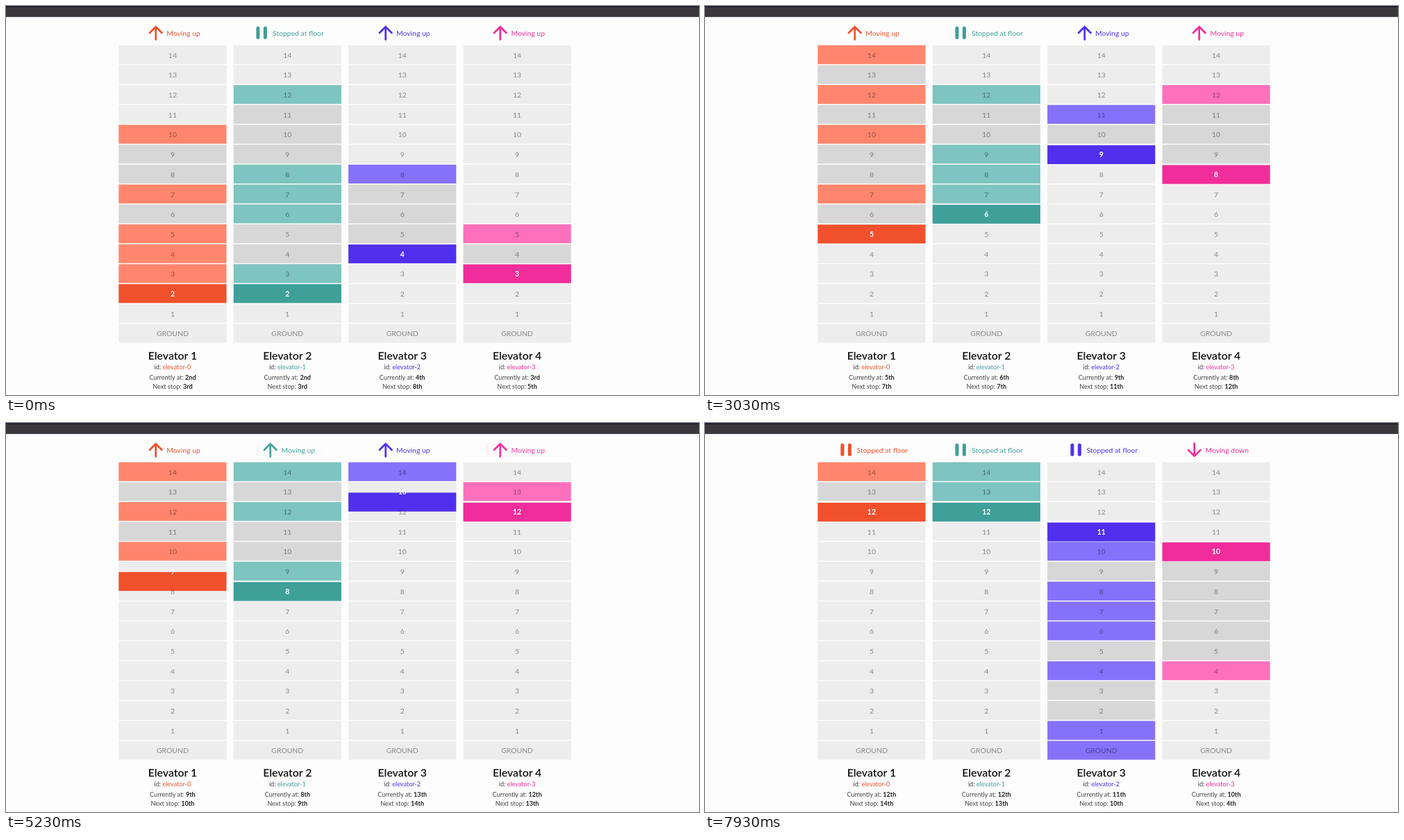
Animation, 998 px wide and 561 px high, one loop 8 s. Source, as an HTML page:

```html
<!DOCTYPE html>
<html lang="en">
<head>
<meta charset="utf-8">
<title>Elevators</title>
<style>
  html, body { margin: 0; width: 100%; height: 100%; overflow: hidden; background: #fdfdfd; }
  body { position: relative; font: 10.4px Lato, sans-serif; color: #444; }
  .bar { position: absolute; inset: 0 0 auto; height: 13px; background: #39373a;
    border-top: 2px solid #242033; border-bottom: 1px solid #5a5560; }
  .boxes { position: absolute; left: 0; top: 0; width: 998px; height: 561px; }
  .shaft { position: absolute; top: 0; width: 155.2px; height: 561px; }
  .label, .line { position: absolute; left: 0; width: 100%; text-align: center; white-space: nowrap; }
  .label { line-height: 28.4px; }
  .status { position: absolute; top: 23px; left: 50%; height: 31px; transform: translateX(-50%);
    display: flex; align-items: center; white-space: nowrap; color: var(--main); }
  .status svg { width: 31.2px; height: 31.2px; flex: none; fill: none; stroke: currentColor; stroke-linecap: round; }
  .line { font-size: 9.1px; line-height: 14px; }
  .title { font-size: 15.8px; font-weight: 600; line-height: 20px; color: #111; }
  .line b { color: #222; }
  .line i { font-style: normal; color: var(--main); }
</style>
</head>
<body>
<div class="bar"></div>
<svg class="boxes"></svg>
<script>
const LOOP = 8000, TICK = 500, FIRST_TICK = 79, LAST_TICK = 16;
const MOVE_MS = 300, CELL_MS = 200, STATUS_MS = 175;
const FLOORS = 15, GROUND_TOP = 458.4, CELL_PITCH = 28.7, CAR_PITCH = 28.62;
const SHAFT_LEFT = 162.3, SHAFT_PITCH = 165.4, CELL_WIDTH = 155.2, CELL_HEIGHT = 27.2;
const IDLE = '#ededee', PATH = '#d7d7d7', TEXT = 'rgba(0,0,0,.43)';

// calls: tick -> floors requested at that tick
const elevators = [
  { main: '#f0512c', soft: '#ff866c', floor: 2, stops: [3, 4, 5, 7, 10], calls: { 1: [12], 4: [14], 12: [11] } },
  { main: '#3f9f99', soft: '#7ec4c0', floor: 2, stopped: true, stops: [3, 6, 7, 8, 12],
    calls: { 6: [9], 10: [14], 16: [13] } },
  { main: '#5030ec', soft: '#8671fb', floor: 4, stops: [8],
    calls: { 4: [11], 8: [14], 12: [11, 10, 8, 7, 6, 4, 1, 0] } },
  { main: '#f02d9a', soft: '#fd70bb', floor: 3, stops: [5], calls: { 2: [12], 10: [13], 12: [4] } }
];

const icons = {
  up: '<path stroke-width="2.7" d="M15.5 25.3V7M6.8 15.7 15.5 7l8.7 8.7"/>',
  down: '<path stroke-width="2.7" d="M15.5 6.2V24.5M6.8 15.8l8.7 8.7 8.7-8.7"/>',
  stop: '<path stroke-width="5" d="M10.3 9v13.2M20.7 9v13.2"/>'
};
const captions = { up: 'Moving up', down: 'Moving down', stop: 'Stopped at floor' };

const clamp = x => Math.max(0, Math.min(1, x));
const easeOut = x => 1 - (1 - x) ** 2;
const smooth = x => x * x * (3 - 2 * x);
const mix = (a, b, p) => a === b ? a : `color-mix(in srgb, ${b} ${(p * 100).toFixed(1)}%, ${a})`;
const cellTop = floor => GROUND_TOP - floor * CELL_PITCH;
const carTop = floor => GROUND_TOP - floor * CAR_PITCH;

function ordinal(n) {
  if (n === 0) return 'Ground';
  return n + (['th', 'st', 'nd', 'rd'][n] || 'th');
}

function add(parent, className, html = '', top) {
  const el = document.createElement('div');
  el.className = className;
  el.innerHTML = html;
  if (top !== undefined) el.style.top = top + 'px';
  return parent.appendChild(el);
}

function addBox(x, y, fill) {
  const box = document.createElementNS('http://www.w3.org/2000/svg', 'rect');
  const attributes = { x, y, width: CELL_WIDTH, height: CELL_HEIGHT };
  for (const name in attributes) box.setAttribute(name, attributes[name]);
  box.style.fill = fill;
  return document.querySelector('.boxes').appendChild(box);
}

function snapshot({ floor, stopped, stops, soft }) {
  const byDistance = [...stops].sort((a, b) => Math.abs(a - floor) - Math.abs(b - floor));
  const next = byDistance[0], last = byDistance.at(-1);
  const colors = Array.from({ length: FLOORS }, (_, f) =>
    stops.includes(f) ? soft : (f - floor) * (f - last) < 0 ? PATH : IDLE);
  return { floor, next, colors, status: stopped ? 'stop' : next > floor ? 'up' : 'down' };
}

// An elevator rests one tick at each stop, then travels a floor per tick.
function simulate(elevator) {
  const e = { ...elevator }, history = [snapshot(e)];
  for (let tick = 1; tick <= LAST_TICK; tick++) {
    if (e.stopped) {
      e.stopped = false;
    } else {
      e.floor += Math.sign(history.at(-1).next - e.floor);
      e.stopped = e.stops.includes(e.floor);
      e.stops = e.stops.filter(f => f !== e.floor);
    }
    e.stops = e.stops.concat(e.calls[tick] || []);
    history.push(snapshot(e));
  }
  return history;
}

function build(elevator, i) {
  const left = SHAFT_LEFT + i * SHAFT_PITCH;
  const shaft = add(document.body, 'shaft');
  shaft.style.left = left + 'px';
  shaft.style.setProperty('--main', elevator.main);
  const each = fn => Array.from({ length: FLOORS }, (_, f) => fn(f));
  const cells = each(f => addBox(left, cellTop(f), IDLE));
  const car = addBox(left, 0, elevator.main);
  const labels = each(f => add(shaft, 'label', f || 'GROUND', cellTop(f)));
  const statuses = {};
  for (const key in icons) {
    statuses[key] = add(shaft, 'status', `<svg viewBox="0 0 31 31">${icons[key]}</svg><span>${captions[key]}</span>`);
  }
  add(shaft, 'line title', `Elevator ${i + 1}`, 494);
  add(shaft, 'line', `id: <i>elevator-${i}</i>`, 514);
  const at = add(shaft, 'line', 'Currently at: <b></b>', 529).lastChild;
  const next = add(shaft, 'line', 'Next stop: <b></b>', 542).lastChild;
  return { history: simulate(elevator), cells, car, labels, statuses, at, next };
}

function draw(view, tick, phase) {
  const now = view.history[tick], before = view.history[Math.max(0, tick - 1)];
  const tint = easeOut(clamp(phase / CELL_MS));
  const fade = smooth(clamp(phase / STATUS_MS));
  const position = before.floor + (now.floor - before.floor) * clamp(phase / MOVE_MS);

  view.car.setAttribute('y', carTop(position));
  view.cells.forEach((cell, f) => {
    cell.style.fill = mix(before.colors[f], now.colors[f], tint);
    const ink = state => state.floor === f ? '#ffffff' : TEXT;
    view.labels[f].style.color = mix(ink(before), ink(now), tint);
    view.labels[f].style.fontWeight = now.floor === f ? 700 : 400;
  });
  for (const key in view.statuses) {
    const opacity = (key === now.status ? fade : 0) + (key === before.status ? 1 - fade : 0);
    view.statuses[key].style.opacity = opacity;
  }
  view.at.textContent = ordinal(now.floor);
  view.next.textContent = ordinal(now.next);
}

const views = elevators.map(build);
const start = performance.now();

function frame() {
  const time = (performance.now() - start) % LOOP;
  const sinceFirst = time - FIRST_TICK + TICK;
  const tick = Math.min(LAST_TICK, Math.floor(sinceFirst / TICK));
  views.forEach(view => draw(view, tick, sinceFirst - tick * TICK));
  requestAnimationFrame(frame);
}
frame();
</script>
</body>
</html>
```
